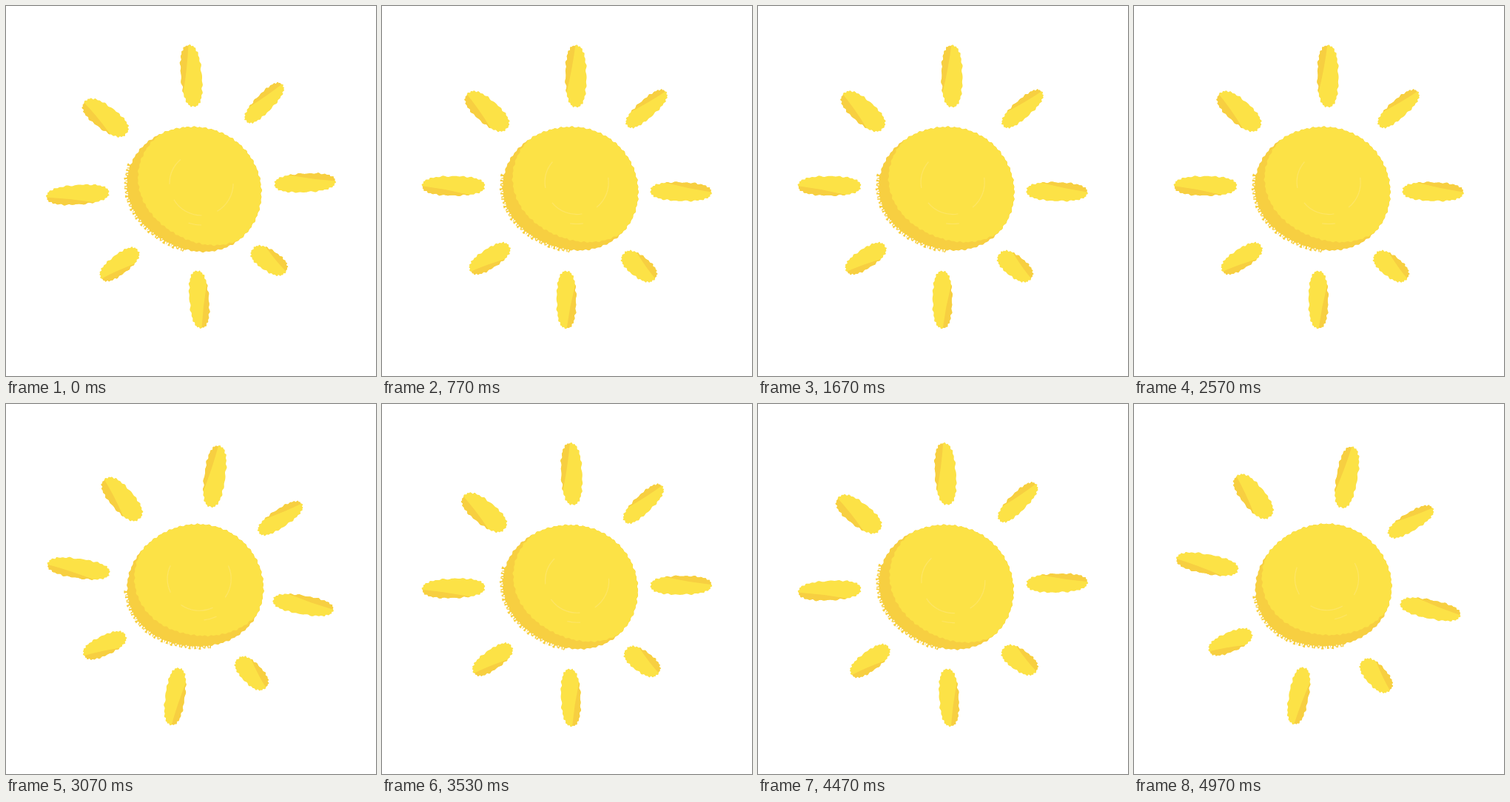
These frames come from a looping animation (500 by 500 pixels, 5000 ms). An HTML page with a canvas:

```html
<!DOCTYPE html>
<html lang="en">
<head>
<meta charset="utf-8">
<title>Wiggling sun</title>
<style>
  html, body { margin: 0; height: 100%; overflow: hidden; background: #fff; }
  canvas { display: block; }
</style>
</head>
<body>
<canvas id="stage" width="500" height="500"></canvas>
<script>
const ctx = document.getElementById('stage').getContext('2d');
const LIGHT = '#fce246', DARK = '#f7cf41', PALE = '#fde566';
const LOOP = 5000, FRAME = 100 / 3, SWING = 27;   // SWING: frames per full swing
const { PI, sin, cos, abs, sign } = Math;
const rad = degrees => degrees * PI / 180;

function trace(point, from = 0, to = 2 * PI, steps = 360) {
  const path = new Path2D();
  for (let i = 0; i <= steps; i++) path.lineTo(...point(from + (to - from) * i / steps));
  return path;
}

// Uneven brush edge, repeating n times around a shape.
const bump = (t, n) => 0.6 * sin(n * t) + 0.4 * sin(Math.round(n * 0.6) * t + 1);

// The disc is a circle bent by three slow waves.
function discEdge(t) {
  const r = 87.3 + 1.5 * cos(t) + 4.8 * cos(2 * (t - rad(23)))
    + 1.3 * cos(3 * (t - rad(65))) + bump(t, 67);
  return [r * cos(t), r * sin(t)];
}
const disc = trace(discEdge);
const fringe = trace(discEdge, rad(99), rad(201));

function rayEdge(long, wide) {
  const round = v => sign(v) * abs(v) ** 0.8;
  return t => [
    (long / 2 + bump(t, 25)) * round(cos(t)),
    (wide / 2 + bump(t, 25)) * round(sin(t))
  ];
}

// Each ray runs from its inner tip to its outer tip.
function makeRay(x1, y1, x2, y2, wide) {
  const long = Math.hypot(x2 - x1, y2 - y1);
  return {
    x: (x1 + x2) / 2, y: (y1 + y2) / 2,
    turn: Math.atan2(y2 - y1, x2 - x1),
    long, wide, path: trace(rayEdge(long, wide))
  };
}
const rays = [
  makeRay(363, 241, 445, 237, 25),
  makeRay(333, 329, 378, 359, 28),
  makeRay(258, 358, 264, 435, 26),
  makeRay(178, 330, 129, 368, 26),
  makeRay(139, 252, 55, 258, 26),
  makeRay(163, 172, 106, 130, 31),
  makeRay(254, 136, 247, 53, 28),
  makeRay(325, 156, 373, 106, 24)
];

function placed(x, y, angle, draw) {
  ctx.save();
  ctx.translate(x, y);
  ctx.rotate(angle);
  draw();
  ctx.restore();
}

function drawRay({ x, y, turn, long, wide, path }) {
  placed(x, y, turn, () => {
    ctx.fillStyle = LIGHT;
    ctx.fill(path);
    ctx.clip(path);
    // shade the outer part of the counterclockwise side
    ctx.fillStyle = DARK;
    ctx.beginPath();
    ctx.moveTo(-long * 0.3, -wide);
    ctx.lineTo(-long * 0.25, -wide * 0.45);
    ctx.quadraticCurveTo(long * 0.15, -wide * 0.15, long * 0.55, 0);
    ctx.lineTo(long, -wide);
    ctx.fill();
  });
}

function line(color, width, dash, path) {
  ctx.strokeStyle = color;
  ctx.lineWidth = width;
  ctx.setLineDash(dash);
  ctx.stroke(path);
}

const swirl = new Path2D();
swirl.arc(10, -7, 43, 0, 4);
const fleck = new Path2D();
fleck.arc(10, -7, 56, rad(90), rad(108));

function drawDisc() {
  line(DARK, 7, [1.7, 2], fringe);
  ctx.fillStyle = DARK;
  ctx.fill(disc);
  ctx.clip(disc);
  // the lit side is the same shape, shifted
  placed(15, -9, 0, () => {
    ctx.fillStyle = LIGHT;
    ctx.fill(disc);
  });
  line(PALE, 1.2, [45, 22], swirl);
  line(PALE, 1.2, [], fleck);
}

function draw(now) {
  const step = Math.floor((now % LOOP + 4) / FRAME) % 150;
  const swing = 1 - abs(1 - 2 * (step % SWING) / SWING);

  ctx.fillStyle = '#fff';
  ctx.fillRect(0, 0, 500, 500);
  placed(250.5, 244, rad(15) * swing, () => {
    ctx.translate(-250.5, -244);
    rays.forEach(drawRay);
  });
  // the disc turns against the rays
  placed(254, 244.5, rad(-30) * swing, () => {
    ctx.translate(0, 2.5);
    drawDisc();
  });
  requestAnimationFrame(draw);
}

draw(0);
</script>
</body>
</html>
```
